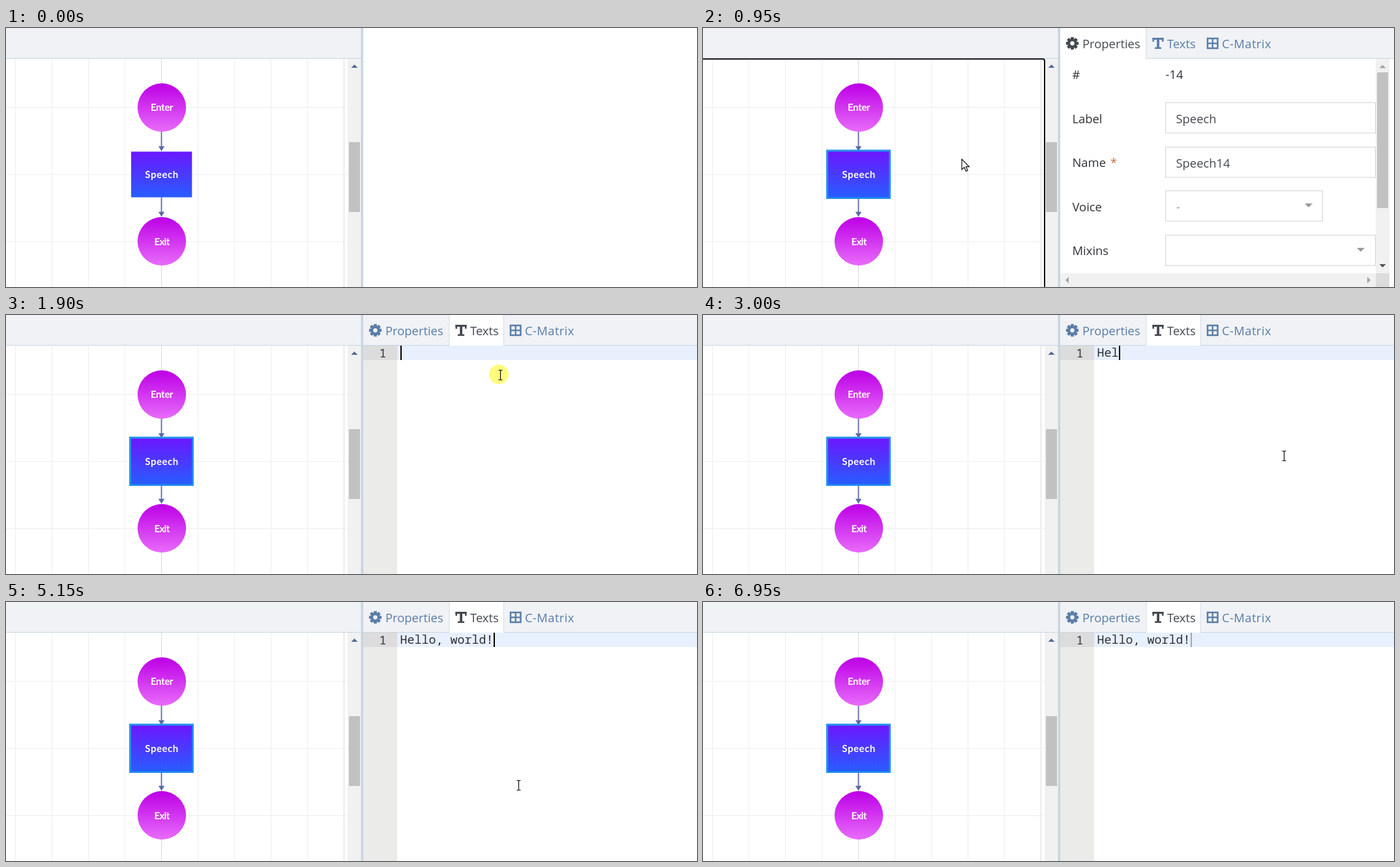
These frames come from a looping animation (1060x397 px, 7000 ms). An HTML page with a canvas:

```html
<!DOCTYPE html>
<html lang="en">
<head>
<meta charset="utf-8">
<title>Editing a speech node</title>
<style>
html, body { margin: 0; width: 100%; height: 100%; overflow: hidden; background: #fff; }
canvas { display: block; }
</style>
</head>
<body>
<canvas id="stage" width="1060" height="397"></canvas>
<script>
const ctx = document.getElementById('stage').getContext('2d');
const UI = '18.4px "Open Sans", sans-serif';
const MONO = '18.33px "Noto Sans Mono", monospace';
const LOOP = 7000, STEP = 50;
const EDGE = '#c8d5e1', HEAD = '#f0f2f6', LINK = '#5a7da6', DARK = '#444950';

const MESSAGE = 'Hello, world!';
const KEYS = [2800, 2900, 3000, 3100, 3200, 3550, 3600, 3650, 3750, 3900, 3950, 4000, 4250];
const BLINKS = [1900, 2250, 2550, 4650, 4950, 5250, 5550, 5900, 6200, 6550, 6800];

// Pointer stops: time, x, y
const PATH = [
  [300, 372, 385], [450, 318, 322], [600, 255, 246], [700, 243, 232], [850, 243, 232],
  [950, 397, 201], [1050, 512, 146], [1200, 640, 78], [1350, 702, 42], [1500, 720, 33],
  [1600, 720, 33], [1700, 735, 58], [1850, 758, 92], [1950, 758, 92], [2100, 822, 152],
  [2300, 891, 216], [4850, 891, 216], [5000, 854, 239], [5150, 786, 281], [5300, 570, 355]
];
const ARROW = new Path2D('M0 0V16L3.8 12.6L6.3 18.5L9 17.4L6.5 11.7H11.3Z');
const HAND = new Path2D('M-2 1Q0-2 2 1V9Q3.5 7.5 5 9.5Q6.5 8.5 8 10.5Q10 10 10 13V16L8 22H-.5L-6 14Q-6 10-2 13Z');
const KNUCKLES = new Path2D('M2 8V13M5 9.5V13M8 10.5V13');
const BEAM = new Path2D('M-3-7.5H-1L0-6.5L1-7.5H3M0-6.5V6.5M-3 7.5H-1L0 6.5L1 7.5H3');

function box(x, y, w, h, fill) {
  ctx.fillStyle = fill;
  ctx.fillRect(x, y, w, h);
}

function frame(x, y, w, h, color, width = 1) {
  ctx.strokeStyle = color;
  ctx.lineWidth = width;
  ctx.strokeRect(x, y, w, h);
}

function label(text, x, y, color, font = UI, align = 'left', spacing = 0) {
  ctx.font = font;
  ctx.fillStyle = color;
  ctx.textAlign = align;
  ctx.letterSpacing = spacing + 'px';
  ctx.fillText(text, x, y);
}

function disc(x, y, r, fill) {
  ctx.fillStyle = fill;
  ctx.beginPath();
  ctx.arc(x, y, r, 0, 2 * Math.PI);
  ctx.fill();
}

// Triangle centred on x, y; turn 0 points down
function tri(x, y, half, height, color, turn = 0) {
  ctx.save();
  ctx.translate(x, y);
  ctx.rotate(turn * Math.PI / 2);
  ctx.fillStyle = color;
  ctx.beginPath();
  ctx.moveTo(-half, -height / 2);
  ctx.lineTo(half, -height / 2);
  ctx.lineTo(0, height / 2);
  ctx.fill();
  ctx.restore();
}

function fade(top, bottom, from, to) {
  const g = ctx.createLinearGradient(0, top, 0, bottom);
  g.addColorStop(0, from);
  g.addColorStop(1, to);
  return g;
}

function link(y) {
  box(237.6, y, 1.8, 24, '#5c69a8');
  tri(238.5, y + 26, 4.7, 7.5, '#5c69a8');
}

function diagram(selected, focused) {
  box(0, 0, 545, 46, HEAD);
  box(0, 46, 545, 1, EDGE);
  for (let i = 0; i < 10; i++) box(14 + 56 * i, 47, 1, 350, i % 5 === 4 ? '#d9d9d9' : '#eeeeee');
  for (let i = 0; i < 3; i++) box(0, Math.round(121.4 + 102.8 * i), 524, 1, '#eeeeee');

  link(159);
  link(259.5);
  for (const y of [122, 327]) disc(239, y, 37.2, fade(y - 37, y + 37, '#bd00e6', '#e86cfa'));
  if (selected) box(189, 186.5, 99, 75.5, '#2391ee');
  box(192, 189.5, 93.3, 70, fade(189, 260, '#6c17ff', '#275dff'));
  const font = '700 15px Lato, sans-serif';
  label('Enter', 239, 126.5, '#fff', font, 'center', -0.4);
  label('Speech', 239, 229.5, '#fff', font, 'center', 0.5);
  label('Exit', 239, 332.5, '#fff', font, 'center', -0.7);

  box(524, 47, 21, 350, '#f1f1f1');
  box(526, 175, 17, 107, '#c1c1c1');
  tri(534.5, 58.5, 5, 5, '#506c9a', 2);
  if (focused) {
    ctx.strokeStyle = '#101010';
    ctx.lineWidth = 2;
    ctx.beginPath();
    ctx.roundRect(-8, 47.5, 532, 370, 3);
    ctx.stroke();
  }
  box(544.5, 0, 3.5, 397, EDGE);
}

function gear(color) {
  ctx.save();
  ctx.translate(566.5, 23.5);
  for (let i = 0; i < 8; i++) {
    box(-2.3, -9.6, 4.6, 5, color);
    ctx.rotate(Math.PI / 4);
  }
  disc(0, 0, 7.4, color);
  ctx.restore();
}

function tabs(editing, hover) {
  box(548, 0, 512, 46, HEAD);
  box(548, 46, 512, 1, EDGE);
  if (hover) box(680, 0, 83, 46, '#f5f7fa');
  if (editing) box(680, 0, 83, 47, '#fff');
  else box(548, 0, 131, 47, '#fff');
  box(679.5, 0, 1, 46, '#d3dde6');
  if (editing || hover) box(763, 0, 1, 46, editing ? '#d3dde6' : '#e3e9ef');

  const first = editing ? LINK : DARK, second = editing ? DARK : LINK;
  gear(first);
  disc(566.5, 23.5, 3.2, editing ? HEAD : '#fff');
  label('Properties', 582, 30.5, first);
  box(689.5, 15, 17, 3, second);
  box(689.5, 15, 2.5, 6, second);
  box(704, 15, 2.5, 6, second);
  box(696.2, 15, 3.8, 17, second);
  box(693, 29.5, 10, 2.5, second);
  label('Texts', 712, 30.5, second);
  frame(774, 16, 15.5, 15, LINK, 2.5);
  box(780.6, 16, 2.3, 15, LINK);
  box(774, 22.4, 15, 2.3, LINK);
  label('C-Matrix', 796, 30.5, LINK, UI, 'left', 0.4);
}

function form() {
  const rows = [['#', 78], ['Label', 146], ['Name', 213], ['Voice', 281], ['Mixins', 348]];
  for (const [name, y] of rows) label(name, 566.5, y, '#2f3338');
  label('*', 625, 213, '#c0704a');
  label('-14', 709.5, 78, '#2f3338');
  [[114.5, 322], [182.5, 322], [249.5, 241], [317.5, 322]].forEach(([y, w]) => frame(709.5, y, w, 46.5, '#cfd3d8'));
  label('Speech', 725.5, 146, DARK);
  label('Speech14', 725.5, 214, DARK);
  label('-', 726, 281, '#999');
  tri(929, 272, 6, 6, '#9a9a9a');
  tri(1009, 340, 6, 6, '#9a9a9a');

  box(1032, 47, 21, 329, '#f1f1f1');
  box(1034, 68, 17, 208, '#c1c1c1');
  tri(1042.5, 59, 5, 5, '#a3a3a3', 2);
  tri(1042.5, 364.5, 5, 5, '#505050');
  box(548, 376, 484, 21, '#f1f1f1');
  box(1032, 376, 21, 21, '#dcdcdc');
  tri(558.5, 386.5, 5, 5, '#a3a3a3', 1);
  tri(1021.5, 386.5, 5, 5, '#a3a3a3', 3);
}

function caretAlpha(t) {
  if (t < 1900) return 0;
  if (t >= 6950) return 0.3;
  if (t >= 2800 && t < 4650) return 1;
  return BLINKS.filter(b => b <= t).length % 2;
}

function editor(t) {
  box(548, 47, 52, 350, '#ebebea');
  box(548, 47, 52, 22, '#dcdcdc');
  box(600, 47, 460, 22, '#e8f0fe');
  label('1', 578, 65, '#333', MONO, 'center');
  const count = KEYS.filter(k => k <= t).length;
  label(MESSAGE.slice(0, count), 604.5, 64, '#2b2f36', MONO);
  ctx.globalAlpha = caretAlpha(t);
  box(605 + 11 * count, 47, 2, 22, '#000');
  ctx.globalAlpha = 1;
}

function place(t) {
  const last = PATH[PATH.length - 1];
  if (t < PATH[0][0] || t > last[0]) return null;
  const i = Math.max(1, PATH.findIndex(p => p[0] >= t));
  const [t0, x0, y0] = PATH[i - 1], [t1, x1, y1] = PATH[i];
  const k = (t - t0) / (t1 - t0);
  return [x0 + (x1 - x0) * k, y0 + (y1 - y0) * k];
}

function pointer(t) {
  const at = place(t);
  if (!at) return;
  const [x, y] = at;
  ctx.save();
  ctx.translate(Math.round(x), Math.round(y));
  if ((t >= 650 && t < 750) || (t >= 1850 && t < 2000)) disc(-2, -1, 15, 'rgba(255, 250, 75, .72)');
  ctx.strokeStyle = '#111';
  ctx.fillStyle = '#fff';
  ctx.lineWidth = 1.2;
  if (t >= 1650 && x > 600 && y > 47) {
    ctx.translate(0.5, 0);
    ctx.stroke(BEAM);
  } else {
    const hand = y < 47 && x > 680;
    const shape = hand ? HAND : ARROW;
    ctx.fill(shape);
    ctx.stroke(shape);
    if (hand) ctx.stroke(KNUCKLES);
  }
  ctx.restore();
}

function draw(t) {
  box(0, 0, 1060, 397, '#fff');
  diagram(t >= 700, t >= 700 && t < 1050);
  if (t >= 900) {
    const editing = t >= 1550;
    tabs(editing, t >= 1350 && !editing);
    if (editing) editor(t);
    else form();
  }
  pointer(t);
}

const start = performance.now();
function tick() {
  const t = (performance.now() - start) % LOOP;
  draw(Math.floor(t / STEP) * STEP);
  requestAnimationFrame(tick);
}
tick();
</script>
</body>
</html>
```
